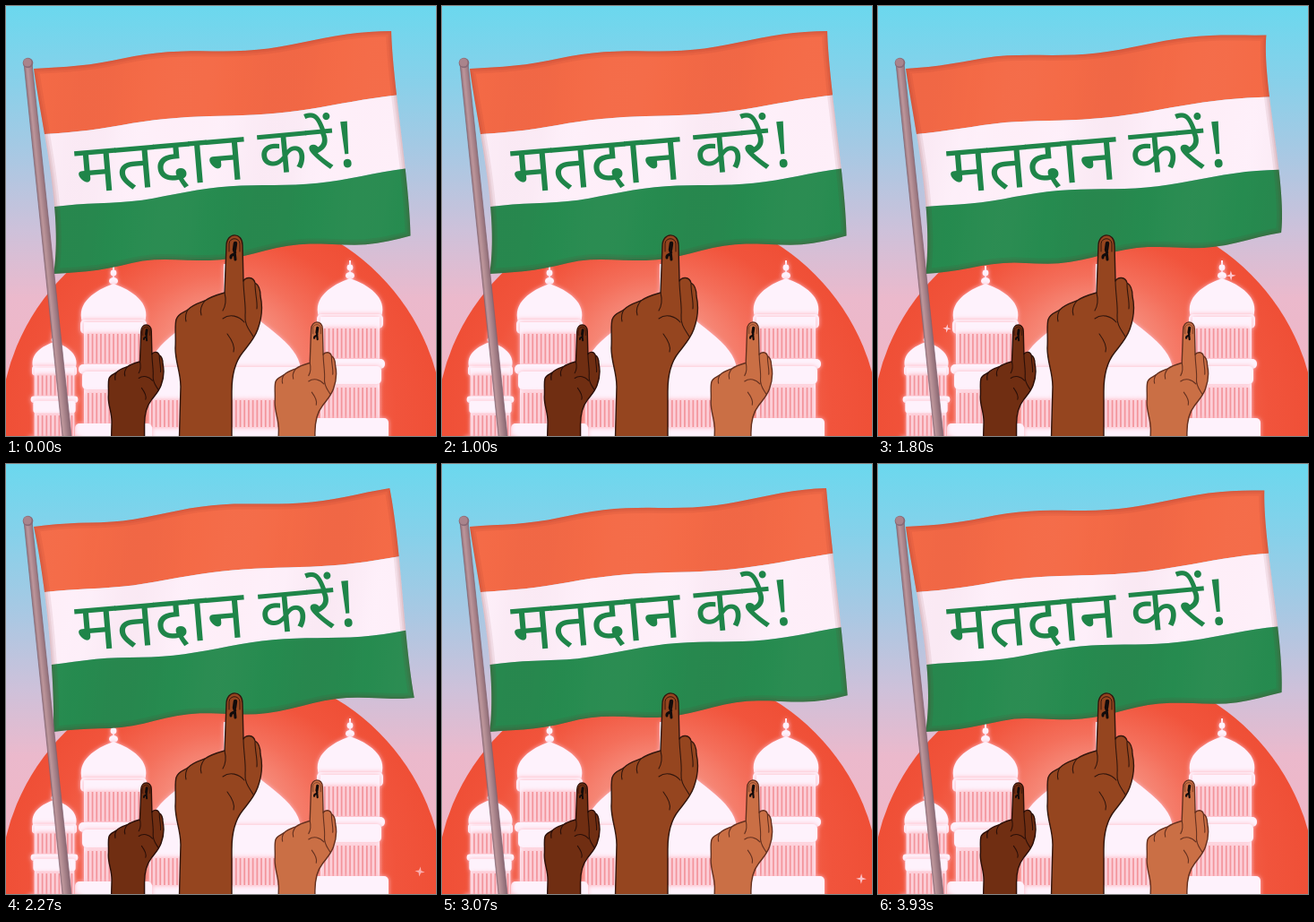
An HTML page with a canvas for the animation above (3.99 s loop, 480 by 480 pixels).

```html
<!DOCTYPE html>
<html lang="hi">
<head>
<meta charset="utf-8">
<title>मतदान करें!</title>
<style>
html, body { margin: 0; width: 100%; height: 100%; overflow: hidden; background: #6fd6ee; }
canvas { display: block; width: 480px; height: 480px; }
</style>
</head>
<body>
<canvas id="stage" width="480" height="480"></canvas>
<script>
const LOOP = 3990, FRAMES = 60, TAU = Math.PI * 2;
const WHITE = '#fef2fc';
const FONT = '"Noto Sans Devanagari", "Noto Sans", sans-serif';
const ctx = document.getElementById('stage').getContext('2d');

const wave = (p, peak, lead = 0) => Math.cos(TAU * ((p - peak) / 15 + lead));

function ramp(g, stops) {
  for (const [at, color] of stops) g.addColorStop(at, color);
  return g;
}

function fillPath(d, color) {
  ctx.fillStyle = color;
  ctx.fill(new Path2D(d));
}

function strokePath(d, color, width) {
  ctx.strokeStyle = color;
  ctx.lineWidth = width;
  ctx.stroke(new Path2D(d));
}

function rect(x, y, w, h, color = WHITE) {
  ctx.fillStyle = color;
  ctx.fillRect(x, y, w, h);
}

function roundRect(x, y, w, h, r) {
  ctx.fillStyle = WHITE;
  ctx.beginPath();
  ctx.roundRect(x, y, w, h, r);
  ctx.fill();
}

function disc(x, y, rx, ry = rx, color = WHITE) {
  ctx.fillStyle = color;
  ctx.beginPath();
  ctx.ellipse(x, y, rx, ry, 0, 0, TAU);
  ctx.fill();
}

// ---- backdrop ----

function drawSky() {
  rect(0, 0, 480, 480, ramp(ctx.createLinearGradient(0, 0, 0, 480), [
    [0, '#6bd8ee'], [.16, '#85d1ea'], [.35, '#a9c8e3'],
    [.52, '#cdc1da'], [.68, '#ebb9cc'], [1, '#f3b4c2']]));
  disc(241, 475, 248, 248, ramp(ctx.createRadialGradient(240, 380, 30, 241, 475, 248), [
    [0, '#f79a8c'], [.4, '#f46f5b'], [.75, '#f1543c'], [1, '#ef4f36']]));
}

function columns(x, y, w, h) {
  rect(x, y, w, h, '#fcdce4');
  for (let i = 2; i < w - 1; i += 4.7) rect(x + i, y, 1.7, h, '#f39299');
}

function tower(x, top, half) {
  const s = half / 37, base = top + 41 * s;
  const ledge = (dy, h, hw) => roundRect(x - hw * s, base + dy * s, hw * 2 * s, h * s, 5 * s);
  rect(x - 1, top - 22 * s, 2, 26 * s);
  disc(x, top - 14 * s, 3.4 * s);
  disc(x, top - 5 * s, 5 * s, 4 * s);
  fillPath(`M${x - 35 * s} ${base} C${x - 42 * s} ${top + 19 * s} ${x - 20 * s} ${top + 5 * s} ${x} ${top - 2 * s}
    C${x + 20 * s} ${top + 5 * s} ${x + 42 * s} ${top + 19 * s} ${x + 35 * s} ${base}Z`, WHITE);
  ledge(-3, 16, 37);
  rect(x - 33 * s, base, 66 * s, 480 - base);
  columns(x - 31 * s, base + 13 * s, 62 * s, 33 * s);
  ledge(47, 11, 39);
  ledge(55, 20, 35);
  columns(x - 31 * s, base + 79 * s, 62 * s, 34 * s);
  ledge(113, 40, 43);
}

function drawPalace() {
  ctx.save();
  ctx.shadowColor = '#ffb5c0';
  ctx.shadowBlur = 5;
  rect(243, 288, 4, 40);
  fillPath('M160 405 C162 375 205 358 245 318 C285 358 326 375 329 405Z', WHITE);
  rect(160, 403, 170, 77);
  columns(160, 440, 170, 30);
  tower(120, 312, 37);
  tower(384, 306, 37);
  tower(54, 376, 25);
  ctx.restore();
}

// ---- flag ----

// Each row: left x, left y, right x, right y, then size and peak of the x sway,
// size and peak of the y sway, and ripples across the cloth.
const ROWS = [
  [31, 70, 431, 30, 3, 10.5, 3.8, 10, 1.8],
  [43, 143, 438, 102.7, 2, 7, 3.2, 7.4, 1.5],
  [52, 224, 447, 184.6, 1.6, 9, 3.2, 6.8, 1.8],
  [53, 299, 453, 257, 3, 5, 4, 4, 2.4]
];

function rowPoint(i, u, p) {
  const [x0, y0, x1, y1, ax, px, ay, py, ripples] = ROWS[i];
  const bulge = i === 2 ? 2.3 * wave(p, 14) * (1 - u) : 0;
  const x = x0 + (x1 - x0 + ax * wave(p, px)) * u + bulge;
  const y = y0 + (y1 - y0) * u + ay * Math.min(1, u * 4) * wave(p, py, ripples * (1 - u));
  return [x, y];
}

// Smooth curve through the four rows.
function flagPoint(v, u, p) {
  let x = 0, y = 0;
  for (let i = 0; i < 4; i++) {
    let w = 1;
    for (let j = 0; j < 4; j++) if (j !== i) w *= (v - j) / (i - j);
    const q = rowPoint(i, u, p);
    x += w * q[0];
    y += w * q[1];
  }
  return [x, y];
}

function band(v0, v1, p) {
  const path = new Path2D(), n = 32;
  const add = (v, u) => path.lineTo(...flagPoint(v, u, p));
  for (let i = 0; i <= n; i++) add(v0, i / n);
  for (let i = 1; i <= n; i++) add(v0 + (v1 - v0) * i / n, 1);
  for (let i = 1; i <= n; i++) add(v1, 1 - i / n);
  for (let i = 1; i < n; i++) add(v1 + (v0 - v1) * i / n, 0);
  path.closePath();
  return path;
}

function drawFlag(p) {
  const colors = ['#f46a46', '#fef0fa', '#258b4f'];
  colors.forEach((c, i) => {
    ctx.fillStyle = c;
    ctx.fill(band(i, i + 1, p));
  });

  const cloth = band(0, 3, p);
  ctx.save();
  ctx.clip(cloth);
  const g = ctx.createLinearGradient(30, 90, 450, 150);
  for (let i = 0; i <= 24; i++) {
    const u = i / 24, s = wave(p, 3, -u * 2);
    g.addColorStop(u, s > 0 ? `rgba(255,190,190,${s * .03})` : `rgba(120,0,40,${-s * .03})`);
  }
  rect(0, 0, 480, 320, g);
  ctx.strokeStyle = 'rgba(110,30,30,.08)';
  for (const w of [3, 7, 12]) {
    ctx.lineWidth = w;
    ctx.stroke(cloth);
  }
  ctx.restore();
}

function word(text, x, y, size, angle) {
  ctx.save();
  ctx.translate(x, y);
  ctx.rotate(-angle * Math.PI / 180);
  ctx.font = `400 ${size}px ${FONT}`;
  ctx.fillText(text, 0, 0);
  ctx.restore();
}

function drawText(p) {
  ctx.fillStyle = '#1f8549';
  word('मतदान', 80, 209, 75.5, 4.9);
  word('करें!', 284 + wave(p, 4), 189 + wave(p, 6), 71, 5.2);
}

function drawPole() {
  const g = ramp(ctx.createLinearGradient(37, 250, 49, 248.8), [
    [0, '#81636d'], [.4, '#bd969b'], [1, '#8d6b75']]);
  fillPath('M20 64 L29 64 L73 480 L63 480Z', g);
  strokePath('M20 64 L63 480 M29 64 L73 480', '#80626f', .7);
  disc(24.5, 63.5, 5.8, 5.8, '#8a6a76');
  disc(24, 63, 4.6, 4.6, '#a9848c');
}

// ---- hands ----

const HAND = `M246 268 C246 252 264 252 264 267 L265 307 C268 302 276 302 278 309
  C283 312 284 318 284 324 C287 337 285 350 281 361 C277 372 270 379 264 387
  C256 397 252 412 252 430 L252 500 L193 500 L195 425 C195 408 189 398 189 382
  C190 370 188 357 190 350 C192 343 199 342 203 339 C209 333 217 331 222 329
  C229 324 237 322 244 320Z`;
const CREASES = `M265 306 C265 320 268 335 267 345 C266 356 272 362 276 369
  M278 310 C278 321 281 330 280 338 M244 320 C246 328 245 335 242 340
  M222 329 C218 334 216 339 218 345 M203 339 C200 344 200 348 201 352
  M242 349 C250 343 260 346 266 353 M247 366 C253 374 256 380 254 386`;

function hand(x, y, s, skin, line) {
  ctx.save();
  ctx.translate(x, y);
  ctx.scale(s, s);
  ctx.translate(-255, -256);
  ctx.lineJoin = ctx.lineCap = 'round';
  fillPath(HAND, skin);
  strokePath(HAND, line, 1.4 / s);
  strokePath(CREASES, line, 1.1 / s);
  strokePath('M249 274 L249 265 C250 258 260 258 261 265 L261 274', line, 1);
  strokePath('M256 265 L255 272', '#120b0b', 4.5);
  strokePath('M255 273 C258 279 250 276 251 281 M255 273 L256 283', '#120b0b', 3);
  ctx.restore();
}

// ---- sparkles: x, y, radius, middle frame, half life, tilt ----

const SPARKS = [
  [9, 346, 6, 4, 3.5, 0], [466, 458, 9, 5, 4, .2],
  [436, 370, 10, 10, 5, 0], [48, 28, 16, 20, 4.5, .35],
  [468, 466, 8, 22, 3.5, 0], [77, 360, 5, 28, 4, .15],
  [394, 301, 6, 28, 4, 0], [10, 300, 7, 30, 2.8, 0],
  [462, 455, 9, 36, 4, .2], [468, 463, 7, 45, 3, 0],
  [455, 390, 8, 54, 2.7, 0]
];

function drawSparks(f) {
  ctx.fillStyle = '#ffe0ee';
  for (const [x, y, r, mid, life, tilt] of SPARKS) {
    const k = 1 - Math.abs(f - mid) / life;
    if (k <= 0) continue;
    const size = r * Math.min(1, k * 1.25);
    ctx.save();
    ctx.globalAlpha = Math.min(1, .3 + k * .7);
    ctx.translate(x, y);
    ctx.rotate(tilt + (f - mid) * .03);
    ctx.beginPath();
    for (let i = 0; i < 8; i++) {
      const a = i * TAU / 8, d = i % 2 ? size * .32 : size;
      ctx.lineTo(d * Math.cos(a), d * Math.sin(a));
    }
    ctx.fill();
    ctx.restore();
  }
}

function draw(now) {
  const f = Math.floor((now % LOOP) / LOOP * FRAMES + .05) % FRAMES;
  const p = f % 15;
  drawSky();
  drawPalace();
  drawSparks(f);
  drawFlag(p);
  drawText(p);
  drawPole();
  hand(156.5, 356, .64, '#702e12', '#2b0f08');
  hand(255, 256, 1, '#95451f', '#32160d');
  hand(347, 353, .71, '#ca6f45', '#64301f');
}

const start = performance.now();
function tick() {
  draw(performance.now() - start);
  requestAnimationFrame(tick);
}
tick();
</script>
</body>
</html>
```
